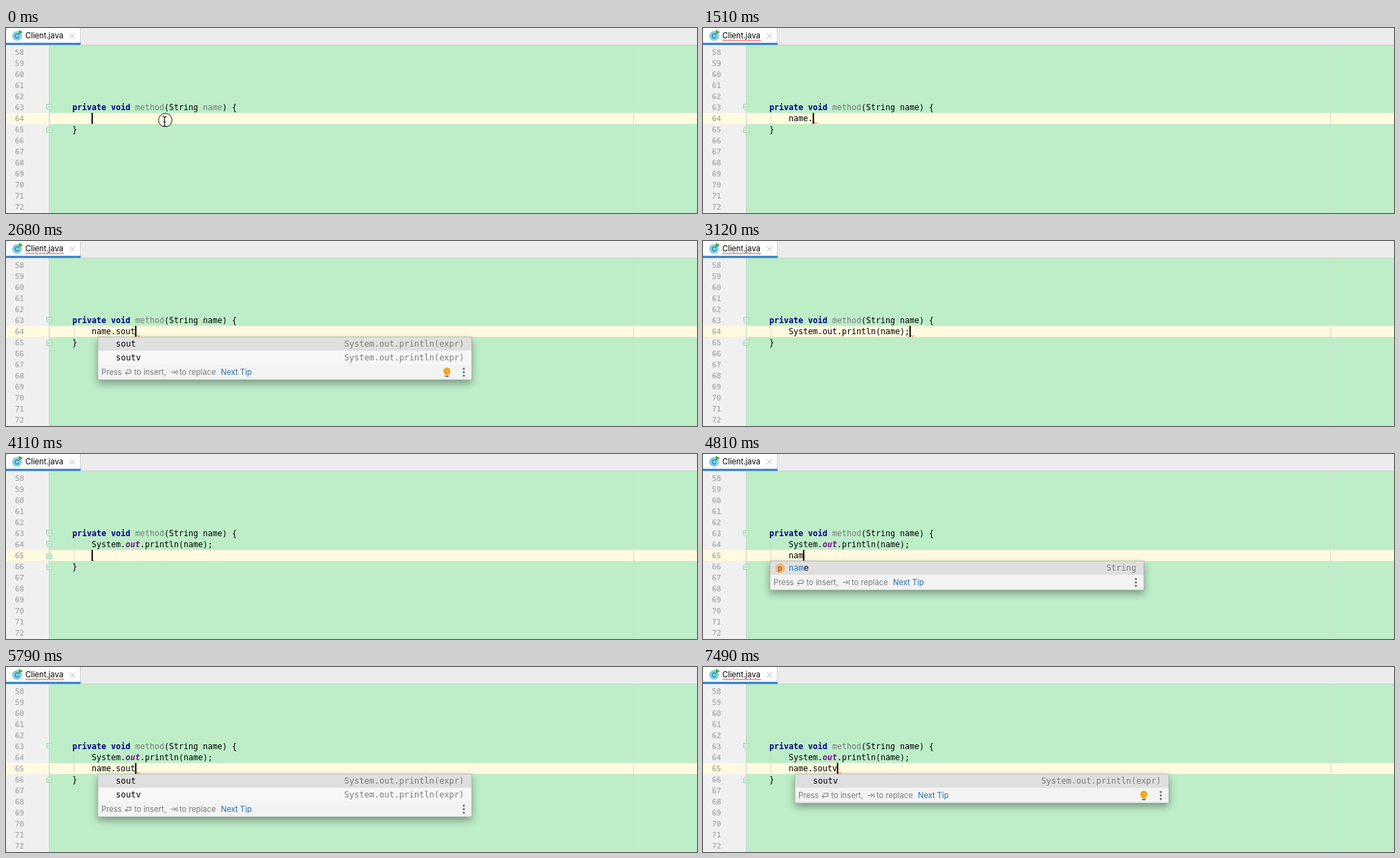
Recreate the animation shown at these times as an HTML page. Size 1000 by 268 pixels, loop 8 s.

```html
<!DOCTYPE html>
<html lang="en">
<head>
<meta charset="utf-8">
<title>Postfix completion</title>
<style>
  html, body { margin: 0; width: 100%; height: 100%; overflow: hidden; background: #bdeec8; }
  svg { display: block; width: 1000px; height: 268px; }
  text { white-space: pre; font-family: "DejaVu Sans Mono", monospace; }
  .code { font-size: 11.63px; }
  .item { font-size: 12px; }
  .num { font-size: 11px; fill: #999; }
  .ui { font-family: Inter, sans-serif; font-size: 11.2px; }
  .key { font-weight: bold; fill: #000080; }
  .field { font-weight: bold; font-style: italic; fill: #7a1289; }
  .grey { fill: #7b7b7b; }
  .match { fill: #1577c8; }
</style>
</head>
<body>
<svg id="stage" viewBox="0 0 1000 268"></svg>
<script>
const LOOP = 8000, CHAR = 7, ROW = 20, HINT = 22;
const stage = document.getElementById('stage');

// name, matched letters, overload mark, arguments, type, icon
const method = (name, mark, args, type) => ({ name, match: 's', mark, args, type, icon: 'm' });
const template = name => ({ name, type: 'System.out.println(expr)' });
const sList = [
  method('startsWith', '', '(String prefix)', 'boolean'),
  method('split', '↑1', '(String regex)', 'String[]'),
  method('startsWith', '↓1', '(String prefix, int toffset)', 'boolean'),
  method('getBytes', '↑5', '()', 'byte[]'),
  method('substring', '', '(int beginIndex)', 'String'),
  method('substring', '', '(int beginIndex, int endIndex)', 'String'),
  method('strip', '', '()', 'String'),
  method('subSequence', '', '(int beginIndex, int endIndex)', 'CharSequence')
];
const sout = template('sout'), soutv = template('soutv');
const soList = [sout, soutv, { ...method('resolveConstantDesc', '', '(Lookup lookup)', 'String'), match: 'so' }];

const popup = (items, more = {}) =>
  ({ x: 133, items, height: items.length * ROW + HINT, hint: true, ...more });
const full = popup(sList, { height: 242, hint: false, thumb: 108 });
const resized = popup(sList, { height: 83, hint: false, thumb: 58 });
const soPopup = popup(soList);
const soutPopup = popup([sout, soutv]);
const soutvPopup = popup([soutv]);
const namePopup = popup([{ name: 'name', match: 'nam', type: 'String', icon: 'p' }], { x: 97 });
const printed = 'System.out.println(name);';

// Each step changes part of the state and keeps the rest.
const steps = [
  [0, { text: '', caret: true, beam: true, ring: true }],
  [90, { ring: false }],
  [540, { caret: false }],
  [710, { text: 'n', caret: true, beam: false }],
  [800, { text: 'na' }],
  [890, { text: 'nam' }],
  [980, { text: 'name' }],
  [1060, { used: true }],
  [1150, { error: true, tail: true }],
  [1510, { text: 'name.' }],
  [1600, { text: 'name.s' }],
  [1690, { popup: full, tail: false }],
  [1870, { text: 'name.so', popup: resized }],
  [1960, { popup: soPopup }],
  [2050, { text: 'name.sou' }],
  [2140, { text: 'name.sout', popup: soutPopup, tail: true }],
  [2680, { bulb: true }],
  [3040, { text: printed, fade: 0.4 }],
  [3120, { popup: null, bulb: false, fade: 1 }],
  [3480, { styled: true }],
  [3570, { error: false, tail: false }],
  [4020, { second: true, text: '' }],
  [4110, { stale: true }],
  [4380, { stale: false }],
  [4640, { text: 'n' }],
  [4730, { text: 'na' }],
  [4810, { text: 'nam', popup: namePopup }],
  [4900, { text: 'name' }],
  [5250, { text: 'name.', popup: null }],
  [5340, { text: 'name.s', popup: full }],
  [5430, { text: 'name.so', popup: resized }],
  [5520, { popup: soPopup, error: true, tail: true }],
  [5700, { text: 'name.sou' }],
  [5790, { text: 'name.sout', popup: soutPopup }],
  [6150, { text: 'name.soutv', popup: soutvPopup }],
  [6690, { bulb: true }],
  [7040, { caret: false }],
  [7490, { caret: true }]
];
let last = {};
const states = steps.map(([at, change]) => (last = { ...last, ...change, at }));

const rect = (x, y, w, h, fill, more = '') =>
  `<rect x="${x}" y="${y}" width="${w}" height="${h}" fill="${fill}" ${more}/>`;
const path = (d, stroke, more = '') => `<path d="${d}" fill="none" stroke="${stroke}" ${more}/>`;
const text = (x, y, cls, body, more = '') => `<text x="${x}" y="${y}" class="${cls}" ${more}>${body}</text>`;
const span = (cls, body) => `<tspan class="${cls}">${body}</tspan>`;
const lineTop = line => 27 + (line - 58) * 16;
const code = (line, col, body) => text(96 + col * CHAR, lineTop(line) + 12, 'code', body);

function wave(x, y, width) {
  let d = `M${x} ${y}`;
  for (let i = 2; i <= width; i += 2) d += `L${x + i} ${y + (i % 4 ? -2 : 0)}`;
  return path(d, '#f03a32', 'stroke-width=".9"');
}

function fold(y, dir) {
  const a = y - 4.5 * dir, b = y + 1.5 * dir, tip = y + 4.5 * dir;
  return `<path d="M58.5 ${a}H66.5V${b}L62.5 ${tip}L58.5 ${b}Z" fill="#c9f0d2" stroke="#a9d9b5"/>` +
    path(`M60.5 ${y - dir}H64.5`, '#a9d9b5');
}

function tab(error) {
  return rect(0, 0, 1000, 24, '#ececec') + rect(0, 24, 1000, 1, '#d0d0d0') +
    rect(0, 0, 107, 22, '#fff') + rect(107, 0, 1, 24, '#d0d0d0') + rect(0, 21.5, 108, 3, '#2e7fc6') +
    '<circle cx="16" cy="11.5" r="7" fill="#7fd0e8"/>' +
    text(16, 15, 'ui', 'C', 'text-anchor="middle" style="font-size:9.5px" fill="#24566a"') +
    '<path d="M18.5 2.5L24.5 6L18.5 9.5Z" fill="#46a83c"/>' +
    text(28, 15, 'ui', 'Client.java') +
    path('M92.5 8L99.5 15M99.5 8L92.5 15', '#b5b5b5') +
    (error ? wave(28, 19, 56) : '');
}

function background(s) {
  const active = s.second ? 65 : 64, end = active + 1;
  let out = rect(0, 24, 1000, 244, '#bdeec8') + rect(0, 24, 62, 244, '#f0f0f0') +
    rect(0, lineTop(active), 1000, 16, '#fffae0') + rect(62, 24, 1, 244, '#cbd3cc') +
    rect(908, 24, 1, 244, '#d3dcd4');
  for (let n = 58; n <= 72; n++) out += text(13, lineTop(n) + 12, 'num', n);
  if (s.text || s.second) {
    out += path(`M98.5 ${lineTop(64)}V${lineTop(end)}`, '#bfd4bd', 'opacity=".7"');
  }
  out += fold(115, 1) + fold(lineTop(end) + 8, -1);
  if (s.stale) out += fold(131, 1) + fold(147, -1);
  return out;
}

function source(s) {
  const styled = 'System.' + span('field', 'out') + '.println(name);';
  const active = s.second ? 65 : 64;
  const shown = s.styled && !s.second ? styled : s.text;
  const caretX = 124 + s.text.length * CHAR, top = lineTop(active);
  return code(63, 0, span('key', 'private void')) + code(63, 13, span('grey', 'method')) +
    code(63, 19, '(String ') + code(63, 27, s.used ? 'name' : span('grey', 'name')) + code(63, 31, ') {') +
    (s.second ? code(64, 4, styled) : '') + code(active, 4, shown) + code(active + 1, 0, '}') +
    (s.tail ? wave(caretX + 0.5, top + 15.5, 6) : '') +
    (s.caret ? rect(caretX - 0.3, top, 2, 16, '#000') : '');
}

function pointer(s) {
  if (!s.beam) return '';
  const d = 'M226.5 128Q229 128 229.5 130Q230 128 232.5 128M229.5 130V141M226.5 143Q229 143 229.5 141Q230 143 232.5 143M227.5 136H231.5';
  return (s.ring ? '<circle cx="230.5" cy="133.5" r="9.8" fill="#fff" fill-opacity=".35" stroke="#111"/>' : '') +
    path(d, '#fff', 'stroke-width="2.6" opacity=".7"') + path(d, '#111', 'stroke-width="1.2"');
}

function itemRow(item, x, y) {
  const { name, match = '', mark, args = '', type, icon } = item;
  const at = name.indexOf(match), baseline = y + 14;
  const label = name.slice(0, at) + span('match', match) + name.slice(at + match.length);
  const weight = icon === 'm' ? 'font-weight="bold"' : '';
  const badge = icon ? `<circle cx="${x + 14.5}" cy="${y + 10.5}" r="7" fill="${icon === 'm' ? '#f7a9b7' : '#f4b96f'}"/>` +
    text(x + 14.5, y + 14, 'ui', icon, 'text-anchor="middle" style="font-size:10px" fill="#5c3a3c"') : '';
  const overload = mark ? ` <tspan fill="${mark[0] === '↑' ? '#00b400' : '#f00000'}">${mark}</tspan> ` : '';
  return badge +
    text(x + (icon === 'p' ? 27 : 26), baseline, 'item',
      `<tspan ${weight}>${label}</tspan>${overload}${span('grey', args)}`) +
    text(x + 530, baseline, 'item grey', type, 'text-anchor="end"');
}

function hintBar(x, y, bulb) {
  const mid = y + 11, grey = '#787878';
  let out = rect(x, y, 541, HINT, '#f3f3f3') +
    text(x + 5, mid + 4, 'ui grey', 'Press') + text(x + 52.5, mid + 4, 'ui grey', 'to insert,') +
    text(x + 118, mid + 4, 'ui grey', 'to replace') +
    text(x + 178, mid + 4, 'ui', 'Next Tip', 'fill="#2470b3"') +
    path(`M${x + 41} ${mid - 3}H${x + 48}V${mid + 1.5}H${x + 39.5}M${x + 42.5} ${mid - 1}L${x + 39.5} ${mid + 1.5}L${x + 42.5} ${mid + 4}`, grey) +
    path(`M${x + 105.5} ${mid}H${x + 113}M${x + 110} ${mid - 2.5}L${x + 113} ${mid}L${x + 110} ${mid + 2.5}M${x + 114.5} ${mid - 3.5}V${mid + 3.5}`, grey);
  for (const dy of [-5, 0, 5]) out += `<circle cx="${x + 529.5}" cy="${mid + dy}" r="1.5" fill="#666"/>`;
  if (bulb) {
    out += `<circle cx="${x + 505}" cy="${mid - 1.5}" r="5.2" fill="#f5a623"/>` +
      rect(x + 502.5, mid + 2, 5, 2.5, '#f5a623') + rect(x + 502.5, mid + 5, 5, 2, '#777');
  }
  return out;
}

function completion(s) {
  const p = s.popup;
  if (!p) return '';
  const { x, height, items } = p, y = lineTop(s.second ? 66 : 65);
  const box = `x="${x}" y="${y}" width="541" height="${height}"`;
  return `<g opacity="${s.fade ?? 1}">
    <rect ${box} fill="#f7f7f7" style="filter:drop-shadow(0 5px 6px rgba(0,0,0,.38))"/>
    <clipPath id="list"><rect ${box}/></clipPath><g clip-path="url(#list)">` +
    rect(x, y, 541, ROW, '#dfdfdf') +
    items.map((item, i) => itemRow(item, x, y + i * ROW)).join('') +
    (p.thumb ? rect(x + 532, y + 2, 7, p.thumb, '#747474', 'rx="3.5"') : '') +
    (p.hint ? hintBar(x, y + height - HINT, s.bulb) : '') +
    `</g><rect ${box} fill="none" stroke="#a9b2aa" stroke-width=".8"/></g>`;
}

let shown;
function frame() {
  const t = performance.now() % LOOP;
  const state = states.findLast(s => s.at <= t);
  if (state !== shown) {
    shown = state;
    stage.innerHTML = background(state) + tab(state.error) + source(state) + pointer(state) + completion(state);
  }
  requestAnimationFrame(frame);
}
frame();
</script>
</body>
</html>
```
